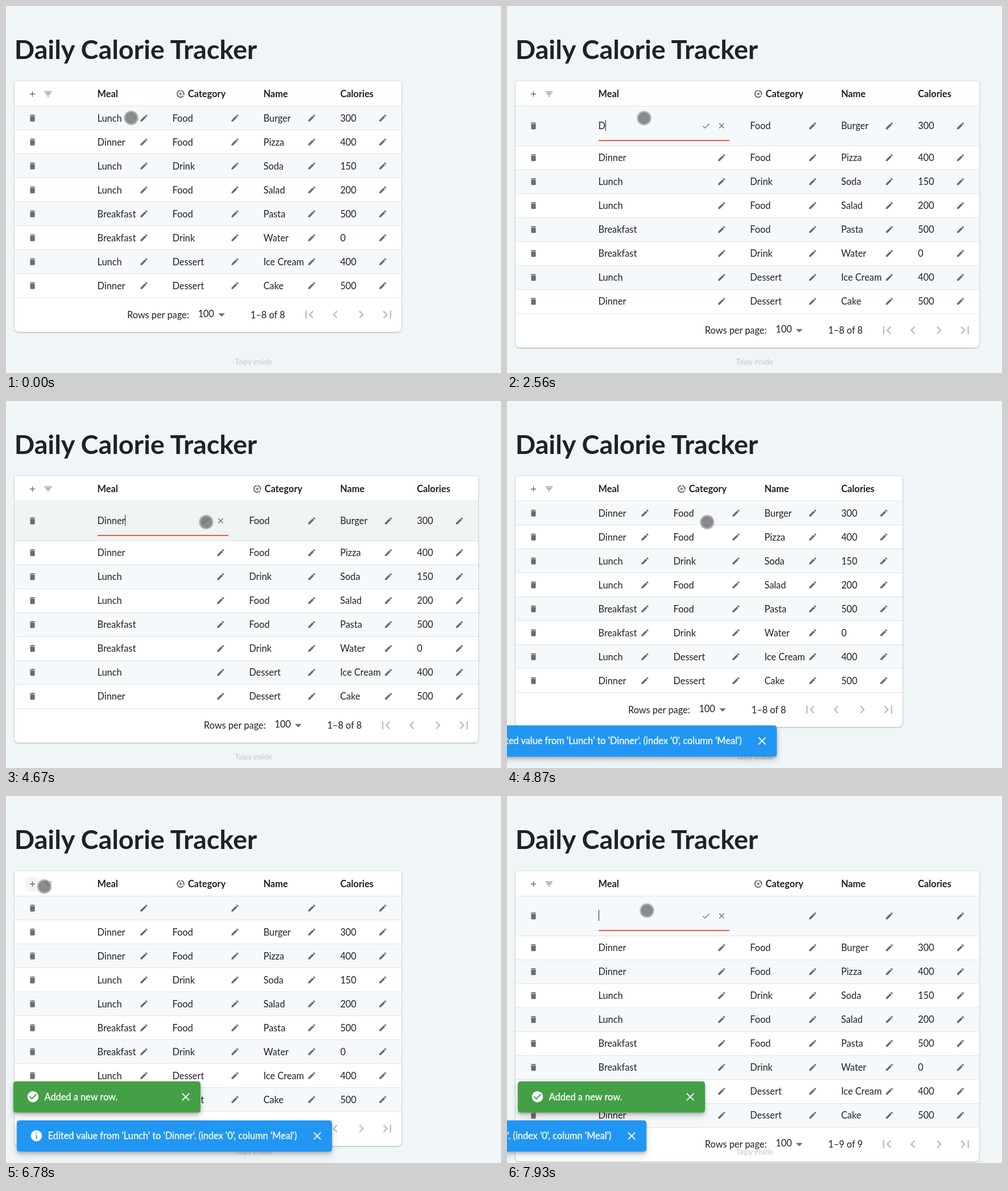
Recreate the animation shown at these times as an HTML page. Size 870 by 644 pixels, loop 7.99 s.

```html
<!DOCTYPE html>
<html lang="en">
<head>
<meta charset="utf-8">
<title>Daily Calorie Tracker</title>
<style>
  html, body { margin: 0; width: 100%; height: 100%; overflow: hidden; background: #f0f5f7; }
  svg { display: block; width: 100%; height: 100%; }
  text { font-family: Lato, "Open Sans", sans-serif; font-size: 16.33px; fill: #212121; }
  .title { font-size: 46.67px; font-weight: 700; fill: #1f2123; }
  .head { font-weight: 700; }
  .brand { font-size: 12.83px; fill: #c1c5c6; }
  .card { fill: #fff; filter: drop-shadow(0 1px 1px rgba(0,0,0,.24)) drop-shadow(0 0 1.5px rgba(0,0,0,.12)); }
  .toast rect { filter: drop-shadow(0 3px 2.9px rgba(0,0,0,.2)) drop-shadow(0 6px 5.8px rgba(0,0,0,.14)); }
  .toast text, .toast path { fill: #fff; }
  .toast text { stroke: #fff; stroke-width: .3px; }
</style>
</head>
<body>
<svg id="stage" viewBox="0 0 870 644"></svg>
<script>
const LOOP = 7990;
const ICONS = {
  add: 'M19 13h-6v6h-2v-6H5v-2h6V5h2v6h6z',
  filter: 'M10 18h4v-2h-4zM3 6v2h18V6zm3 7h12v-2H6z',
  trash: 'M6 19c0 1.1.9 2 2 2h8c1.1 0 2-.9 2-2V7H6zM19 4h-3.5l-1-1h-5l-1 1H5v2h14z',
  edit: 'M3 17.25V21h3.75L17.81 9.94l-3.75-3.75zM20.71 7.04c.39-.39.39-1.02 0-1.41l-2.34-2.34c-.39-.39-1.02-.39-1.41 0l-1.83 1.83 3.75 3.75z',
  group: 'M11 8v3H8v2h3v3h2v-3h3v-2h-3V8zm2-5.95v3.03c3.39.49 6 3.39 6 6.92 0 .9-.18 1.75-.48 2.54l2.6 1.53c.56-1.24.88-2.62.88-4.07 0-5.18-3.95-9.45-9-9.95zM12 19c-3.87 0-7-3.13-7-7 0-3.53 2.61-6.43 6-6.92V2.05c-5.06.5-9 4.76-9 9.95 0 5.52 4.47 10 9.99 10 3.31 0 6.24-1.61 8.06-4.09l-2.6-1.53C16.17 17.98 14.21 19 12 19z',
  check: 'M9 16.17L4.83 12l-1.42 1.41L9 19 21 7l-1.41-1.41z',
  close: 'M19 6.41L17.59 5 12 10.59 6.41 5 5 6.41 10.59 12 5 17.59 6.41 19 12 13.41 17.59 19 19 17.59 13.41 12z',
  drop: 'M7 10l5 5 5-5z',
  first: 'M18.41 16.59L13.82 12l4.59-4.59L17 6l-6 6 6 6zM6 6h2v12H6z',
  prev: 'M15.41 7.41L14 6l-6 6 6 6 1.41-1.41L10.83 12z',
  next: 'M10 6L8.59 7.41 13.17 12l-4.58 4.59L10 18l6-6z',
  last: 'M5.59 7.41L10.18 12l-4.59 4.59L7 18l6-6-6-6zM16 6h2v12h-2z',
  info: 'M12 2C6.48 2 2 6.48 2 12s4.48 10 10 10 10-4.48 10-10S17.52 2 12 2zm1 15h-2v-6h2zm0-8h-2V7h2z',
  done: 'M12 2C6.48 2 2 6.48 2 12s4.48 10 10 10 10-4.48 10-10S17.52 2 12 2zm-2 15l-5-5 1.41-1.41L10 14.17l7.59-7.59L19 8z'
};
const FOODS = ['Dinner Food Pizza 400', 'Lunch Drink Soda 150', 'Lunch Food Salad 200',
  'Breakfast Food Pasta 500', 'Breakfast Drink Water 0', 'Lunch Dessert Ice_Cream 400',
  'Dinner Dessert Cake 500'];
const COLS = [160.5, 292.5, 452.4, 587.4];
const PENS = [242.5, 402.5, 537.3, 662.3];

const icon = (name, x, y, size = 16.33, fill = '#6b6c6d') =>
  `<path d="${ICONS[name]}" fill="${fill}" transform="translate(${x - size / 2} ${y - size / 2}) scale(${size / 24})"/>`;
const text = (x, y, s, cls = '') => `<text x="${x}" y="${y}" class="${cls}">${s}</text>`;
const rect = (x, y, w, h, fill, more = '') =>
  `<rect x="${x}" y="${y}" width="${w}" height="${h}" fill="${fill}" ${more}/>`;

function table(id, rows, wide) {
  const dx = wide ? 134.8 : 0;
  const dy = wide ? 28 : 0;
  const right = 695 + (wide ? 135 : 0);
  const end = 176 + rows.length * 42 + dy;
  const foot = end + 30 - dy / 56;
  const bottom = end + 60 - dy / 56;
  let s = `<path class="card" d="M15 134q0-2 2-2H${right - 2}q2 0 2 2V${bottom - 8}q0 8-8 8H23q-8 0-8-8z"/>`;
  s += icon('add', 46.5, 154.5) + icon('filter', 74, 154.3) + icon('group', 306.8 + dx, 154.2);
  s += text(COLS[0], 160, 'Meal', 'head') + text(319.8 + dx, 160, 'Category', 'head')
    + text(COLS[2] + dx, 160, 'Name', 'head') + text(COLS[3] + dx, 160, 'Calories', 'head');
  s += rect(15, 175, right - 15, 1, '#e0e3e4');

  rows.forEach((row, i) => {
    const open = wide && i === 0;
    const top = 176 + i * 42 + (i ? dy : 0);
    const h = open ? 70 : 42;
    const mid = open ? 210.3 : top + 20.6 - dy / 56;
    const base = open ? 216 : top + 27 - (wide ? 1 : 0);
    if (i % 2 === 0) s += rect(15, top, right - 15, h - 1, '#f6f9fb', i ? '' : 'class="lead"');
    s += rect(15, top + h - 1, right - 15, 1, '#e0e3e4') + icon('trash', 46.5, mid);
    const cells = row.split(' ');
    PENS.forEach((x, c) => {
      if (open && c === 0) return;
      s += icon('edit', x + dx, mid);
      if (cells[c]) s += text(COLS[c] + (c ? dx : 0), base, cells[c].replace('_', ' '));
    });
  });

  const n = rows.length;
  const line = Math.floor(foot) + 6;
  s += text(213 + dx, line, 'Rows per page:') + text(337.4 + dx, line - 2, '100')
    + icon('drop', 379 + dx, foot - .3, 28, '#707172') + text(429.7 + dx, line, `1–${n} of ${n}`);
  ['first', 'prev', 'next', 'last'].forEach((name, i) => {
    s += icon(name, 533 + i * 45.67 + dx, foot - .5, 28, '#bcbdbe');
  });
  return `<g id="${id}">${s}</g>`;
}

const toast = (id, y, w, fill, mark, msg) => `<g id="${id}" class="toast">`
  + rect(19, y, w, 54.7, fill, 'rx="4.67"') + icon(mark, 53.5, y + 27, 23.33)
  + text(73.7, y + 33, msg) + icon('close', w - 7, y + 27.2, 23.33) + '</g>';

const before = ['Lunch Food Burger 300', ...FOODS];
const after = ['Dinner Food Burger 300', ...FOODS];
const added = ['', ...after];

const stage = document.getElementById('stage');
stage.innerHTML = text(14.8, 93, 'Daily Calorie Tracker', 'title')
  + table('start', before, false) + table('editing', before, true)
  + table('saved', after, false) + table('grown', added, false) + table('filling', added, true)
  + '<g id="halo"><circle cx="46.5" cy="154.5" r="13" fill="#000" opacity=".045"/></g>'
  + '<g id="field">' + text(COLS[0], 216, '').replace('<text', '<text id="value"')
  + icon('check', 350, 210.3) + icon('close', 377.3, 210.3)
  + rect(161, 236, 230, 1, '#8f9192') + rect(0, 235, 0, 2, '#f15a42', 'id="focus"')
  + rect(0, 200, 1, 19, '#222', 'id="caret"') + '</g>'
  + text(402.5, 629, 'Taipy inside', 'brand')
  + toast('blue', 569.3, 554, '#2196f3', 'info', "Edited value from 'Lunch' to 'Dinner'. (index '0', column 'Meal')")
  + toast('green', 500.8, 329, '#43a047', 'done', 'Added a new row.')
  + '<g id="cursor"><circle r="11.5" fill="#6e6e6e" fill-opacity=".8" stroke="#b2b4b5" stroke-width="2.6" stroke-opacity=".9"/></g>';

const el = {};
stage.querySelectorAll('[id]').forEach(n => { el[n.id] = n; });
const leads = stage.querySelectorAll('.lead');

const clamp = v => Math.min(1, Math.max(0, v));
const within = (t, a, b) => t >= a && t < b;
const show = (node, on) => { node.style.display = on ? '' : 'none'; };

function bezier(x1, y1, x2, y2) {
  const at = (a, b, s) => 3 * (1 - s) * (1 - s) * s * a + 3 * (1 - s) * s * s * b + s * s * s;
  return p => {
    let lo = 0, hi = 1;
    for (let i = 0; i < 24; i++) {
      const m = (lo + hi) / 2;
      if (at(x1, x2, m) < p) lo = m; else hi = m;
    }
    return p >= 1 ? 1 : at(y1, y2, lo);
  };
}
const decel = bezier(0, 0, .2, 1);
const sharp = bezier(.4, 0, .6, 1);
const EASE = {
  in: p => p * p,
  out: p => p * (2 - p),
  both: p => p * p * (3 - 2 * p)
};

// time, x, y, easing of the move that ends here
const PATH = [
  [0, 220, 196.3], [340, 220, 196.3], [820, 241, 196.7, 'both'], [3630, 241, 196.7],
  [3890, 302.3, 181.8, 'in'], [4480, 351.8, 212.5, 'out'], [5090, 351.8, 212.5],
  [5890, 22.8, 181, 'both'], [6300, 46, 155, 'both'], [6590, 46, 155],
  [6780, 67, 158.7, 'in'], [7520, 246, 201, 'out'], [LOOP, 246, 201]
];
function cursorAt(t) {
  const i = Math.max(1, PATH.findIndex(k => k[0] > t));
  const [a, b] = [PATH[i - 1], PATH[i]];
  const p = EASE[b[3] || 'both'](clamp((t - a[0]) / (b[0] - a[0])));
  return [a[1] + (b[1] - a[1]) * p, a[2] + (b[2] - a[2]) * p];
}

const KEYS = [2490, 2620, 2750, 2950, 3090, 3150];
const OPEN = 1302, SAVE = 4740, GROW = 6580, FILL = 7740;
const SCENES = { start: [0, OPEN], editing: [OPEN, SAVE], saved: [SAVE, GROW], grown: [GROW, FILL], filling: [FILL, LOOP] };

function slide(node, t, from, width, leave = Infinity) {
  show(node, t >= from);
  const p = decel(clamp((t - from) / 225)) - sharp(clamp((t - leave) / 195));
  node.setAttribute('transform', `translate(${(p - 1) * width} 0)`);
}

function draw(t) {
  for (const id in SCENES) show(el[id], within(t, ...SCENES[id]));
  const hover = within(t, 1090, 1440) || within(t, 4540, SAVE) || within(t, 7580, 7800);
  leads.forEach(n => n.setAttribute('fill', hover ? '#f0f4f5' : '#f6f9fb'));
  show(el.halo, within(t, 6400, 6900));

  const editing = within(t, OPEN, SAVE), filling = t >= FILL;
  show(el.field, editing || filling);
  if (editing || filling) {
    const typed = 'Dinner'.slice(0, KEYS.filter(k => k <= t).length);
    el.value.textContent = filling ? '' : t < 2090 ? 'Lunch' : typed;
    el.caret.setAttribute('x', Math.round(COLS[0] + el.value.getComputedTextLength()));
    show(el.caret, !(within(t, 1890, 2350) || within(t, 3690, 4190)));
    const half = 115 * decel(clamp((t - (filling ? FILL : OPEN)) / 200));
    el.focus.setAttribute('x', 276 - half);
    el.focus.setAttribute('width', half * 2);
  }

  slide(el.blue, t, 4762, 573, 7825);
  slide(el.green, t, 6596, 348);
  el.cursor.setAttribute('transform', `translate(${cursorAt(t).join(' ')})`);
}

const begin = performance.now();
function tick() {
  draw((performance.now() - begin) % LOOP);
  requestAnimationFrame(tick);
}
tick();
</script>
</body>
</html>
```
